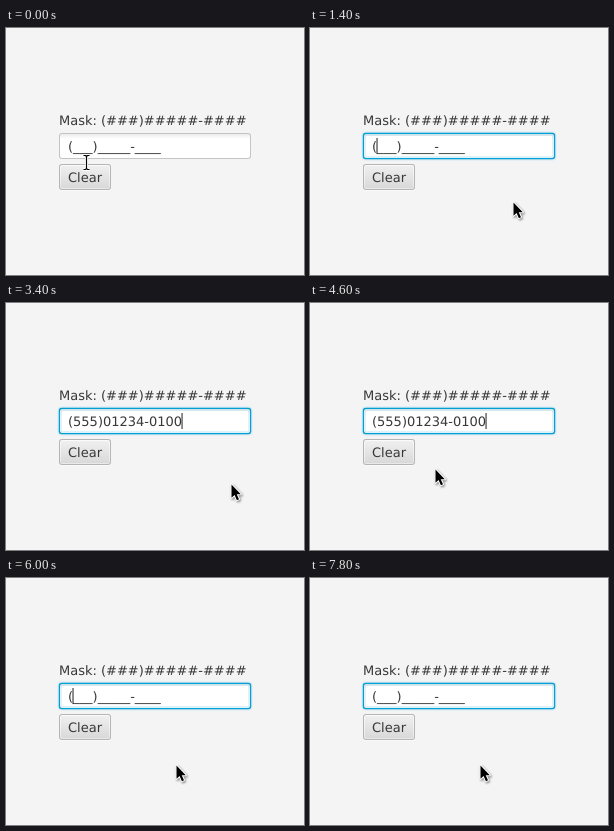
Write an HTML page that moves like this. It is 298 px wide and 247 px high and loops after 8000 ms.

```html
<!DOCTYPE html>
<html lang="en">
<head>
<meta charset="utf-8">
<title>Masked text field</title>
<style>
  html, body { margin: 0; width: 100%; height: 100%; overflow: hidden; background: #f4f4f4; }
  svg { display: block; width: 298px; height: 247px; }
  text {
    font: 13px "DejaVu Sans", Verdana, sans-serif;
    fill: #383838;
    text-rendering: geometricPrecision;
    white-space: pre;
  }
  .ring { fill: #039ed3; }
  .faint { fill: #039ed3; fill-opacity: .13; }
  .ring, .faint { visibility: hidden; }
  .focused .ring, .focused .faint { visibility: visible; }
  .body { fill: url(#plain); }
  .hover .body { fill: url(#light); }
  .pressed .body { fill: url(#dark); }
</style>
</head>
<body>
<svg viewBox="0 0 298 247">
  <defs>
    <linearGradient id="inset" x2="0" y2="1">
      <stop stop-color="#ececec"/><stop offset=".2" stop-color="#fff"/>
    </linearGradient>
    <linearGradient id="rim" x2="0" y2="1">
      <stop stop-color="#fbfbfb"/><stop offset="1" stop-color="#e8e8e8"/>
    </linearGradient>
    <linearGradient id="plain" x2="0" y2="1">
      <stop stop-color="#efefef"/><stop offset="1" stop-color="#d9d9d9"/>
    </linearGradient>
    <linearGradient id="light" x2="0" y2="1">
      <stop stop-color="#f6f6f6"/><stop offset="1" stop-color="#e2e2e2"/>
    </linearGradient>
    <linearGradient id="dark" x2="0" y2="1">
      <stop stop-color="#e2e2e2"/><stop offset="1" stop-color="#cdcdcd"/>
    </linearGradient>
    <filter id="soft" x="-50%" y="-50%" width="200%" height="200%">
      <feGaussianBlur stdDeviation=".8"/>
    </filter>
    <path id="head" d="M.5 1.5V14.8L3.6 12L5.9 17.2L8 16.2L5.7 11.2H9.8Z"/>
    <path id="bar" d="M-3-7H-1L0-6L1-7H3M0-6V6M-3 7H-1L0 6L1 7H3"/>
  </defs>

  <text x="53" y="97">Mask: (###)#####-####</text>

  <g id="field">
    <rect x="53" y="105" width="192" height="26" rx="3" fill="#c4c4c4"/>
    <rect class="ring" x="52.8" y="104.8" width="192.4" height="26.4" rx="3"/>
    <rect x="54" y="106" width="190" height="24" rx="2" fill="url(#inset)"/>
    <rect class="faint" x="51.6" y="103.6" width="194.8" height="28.8" rx="4"/>
    <rect class="ring" x="56" y="108" width="186" height="20" style="fill:#fff"/>
    <text id="value" x="62" y="123"></text>
    <rect id="caret" y="110" width="1.1" height="16" fill="#333"/>
  </g>

  <g id="button">
    <rect x="53" y="137" width="52" height="26" rx="3" fill="#fafafa"/>
    <rect x="53" y="136" width="52" height="26" rx="3" fill="#b5b5b5"/>
    <rect class="ring" x="52.8" y="135.8" width="52.4" height="26.4" rx="3"/>
    <rect x="54" y="137" width="50" height="24" rx="2" fill="url(#rim)"/>
    <rect class="faint" x="51.6" y="134.6" width="54.8" height="28.8" rx="4"/>
    <rect class="body" x="55" y="138" width="48" height="22" rx="1"/>
    <text x="62" y="154">Clear</text>
  </g>

  <g id="arrow" stroke-linejoin="round">
    <use href="#head" x="1" y="1.2" stroke="#000" stroke-width="2" opacity=".45" filter="url(#soft)"/>
    <use href="#head" stroke="#fff" stroke-width="2"/>
    <use href="#head"/>
  </g>
  <g id="beam" fill="none">
    <use href="#bar" stroke="#fff" stroke-width="3"/>
    <use href="#bar" stroke="#000" stroke-width="1.2"/>
  </g>
</svg>
<script>
  const LOOP = 8000, STEP = 100;
  const PRESS = 4900, CLEAR = 5000, CLICKS = [700, 5700];
  const DIGITS = '555012340100';
  const $ = id => document.getElementById(id);
  const [field, button, value, caret, arrow, beam] =
    ['field', 'button', 'value', 'caret', 'arrow', 'beam'].map($);

  // pointer stops: time, x, y
  const stops = [
    [0, 80, 134], [200, 94, 133], [400, 94, 133], [700, 108, 120], [1000, 108, 120],
    [1400, 203, 173], [1600, 225, 180], [4100, 225, 180], [4300, 208, 190],
    [4600, 125, 165], [PRESS, 88, 150], [5500, 80, 130], [5700, 84, 121],
    [6000, 170, 186], [LOOP, 170, 186]
  ];

  // bursts of three keys, one per step: start time, digits per key
  const bursts = [[1800, 1], [2500, 1], [2800, 1], [3200, 1], [6700, 1], [7400, -1]];

  const within = (v, a, b) => v >= a && v < b;
  const mix = (a, b, k) => Math.round(a + (b - a) * k);
  const show = (node, on) => node.setAttribute('visibility', on ? 'visible' : 'hidden');
  const move = (node, x, y) => node.setAttribute('transform', `translate(${x} ${y})`);

  function pointerAt(t) {
    const i = stops.findIndex(s => s[0] > t);
    const [t0, x0, y0] = stops[i - 1], [t1, x1, y1] = stops[i];
    const k = (t - t0) / (t1 - t0);
    return [mix(x0, x1, k), mix(y0, y1, k)];
  }

  // digits entered, and the time of the last key or click
  function inputAt(t) {
    let count = 0, last = Math.max(...CLICKS.filter(c => c <= t), 0);
    for (const [start, sign] of bursts) {
      if (start > t) break;
      const keys = Math.min((t - start) / STEP + 1, 3);
      if (start > CLEAR || t < CLEAR) count += sign * keys;
      last = Math.max(last, start + (keys - 1) * STEP);
    }
    return [count, last];
  }

  function masked(n) {
    let i = 0;
    return '(###)#####-####'.replace(/#/g, () => i < n ? DIGITS[i++] : '_');
  }

  function draw(t) {
    const [n, last] = inputAt(t);
    const inField = within(t, CLICKS[0], PRESS) || t >= CLICKS[1];
    const inButton = within(t, PRESS, CLICKS[1]);
    const [x, y] = pointerAt(t);
    const isBeam = t < STEP || y < 131;
    const over = !isBeam && within(x, 53, 105) && within(y, 136, 162);

    value.textContent = masked(n);
    const index = n + (n <= 3 ? 1 : n <= 8 ? 2 : 3);
    caret.setAttribute('x', 61.4 + value.getSubStringLength(0, index));
    show(caret, inField && (t - last) % 300 < 200);

    field.classList.toggle('focused', inField);
    button.classList.toggle('focused', inButton);
    button.classList.toggle('hover', over);
    button.classList.toggle('pressed', within(t, PRESS, CLEAR));

    show(arrow, !isBeam);
    show(beam, isBeam);
    move(arrow, x, y);
    move(beam, x + .5, y + .5);
  }

  const start = performance.now();
  function tick() {
    const t = (performance.now() - start) % LOOP;
    draw(Math.floor(t / STEP) * STEP);
    requestAnimationFrame(tick);
  }
  tick();
</script>
</body>
</html>
```
